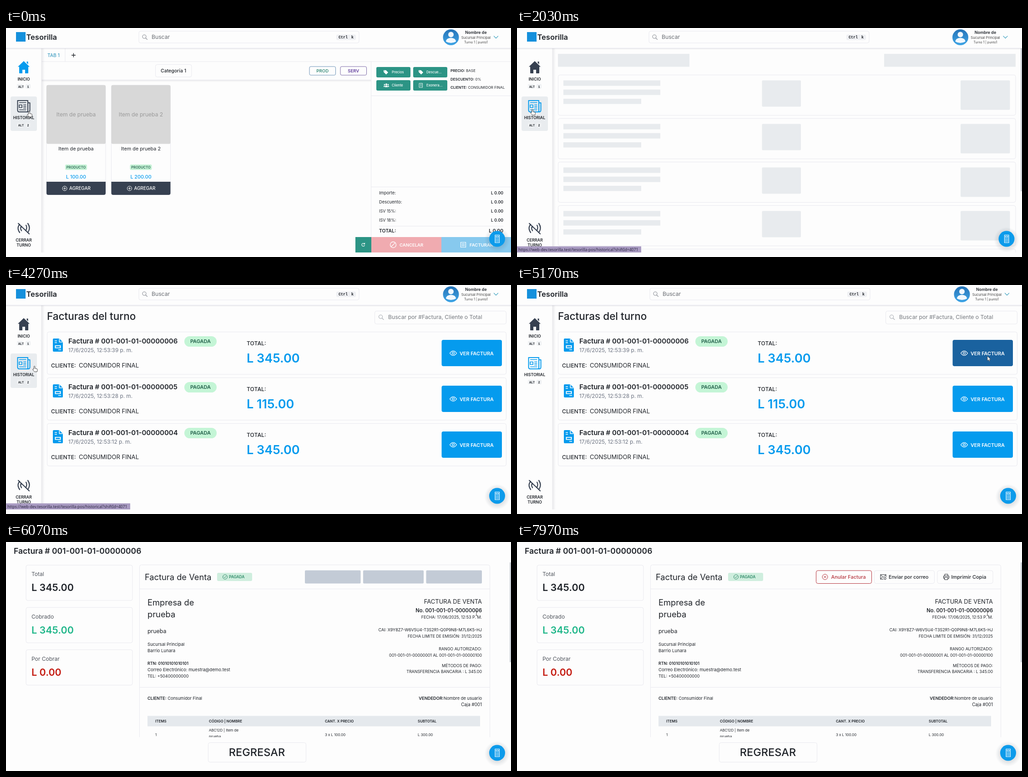
Animation of 1110x505 px, one loop 8 s. Source, as an HTML page:

```html
<!DOCTYPE html>
<html lang="es">
<head>
<meta charset="utf-8">
<title>Punto de venta</title>
<style>
html, body { margin: 0; width: 100%; height: 100%; overflow: hidden; background: #fdfdfd; }
svg { display: block; width: 1110px; height: 505px; font-family: Inter, sans-serif; cursor: default; user-select: none; }
</style>
</head>
<body>
<svg id="stage" viewBox="0 0 1110 505" xmlns="http://www.w3.org/2000/svg"></svg>
<script>
const LOOP = 8000;
const BLUE = '#059bee', DARK = '#374151', INK = '#1f2329', LINE = '#e9e9ef', TEAL = '#2c9485', BONE = '#e8ebee', PAGE = '#fdfdfd';
const MONO = "'Liberation Mono', monospace";

// Markup helpers
const text = (x, y, s, size, { w = 400, fill = INK, a = 'start', font = '' } = {}) =>
  `<text x="${x}" y="${y}" font-size="${size}" font-weight="${w}" fill="${fill}" text-anchor="${a}"${font && ` font-family="${font}"`}>${s}</text>`;
const rect = (x, y, w, h, fill, r = 0, stroke = 'none', extra = '') =>
  `<rect x="${x}" y="${y}" width="${w}" height="${h}" rx="${r}" fill="${fill}" stroke="${stroke}" ${extra}/>`;
const box = (x, y, w, h, r = 4) => rect(x, y, w, h, PAGE, r, LINE);
const line = (d, stroke = LINE, width = 1) =>
  `<path d="${d}" fill="none" stroke="${stroke}" stroke-width="${width}" stroke-linecap="round" stroke-linejoin="round"/>`;
const shape = (d, fill) => `<path d="${d}" fill="${fill}" fill-rule="evenodd"/>`;
const circle = (x, y, r, fill = 'none', stroke = 'none', width = 1) =>
  `<circle cx="${x}" cy="${y}" r="${r}" fill="${fill}" stroke="${stroke}" stroke-width="${width}"/>`;
const group = (s, attrs = '') => `<g ${attrs}>${s}</g>`;
const at = (x, y, s) => group(s, `transform="translate(${x} ${y})"`);
const bold = (s, w = 600) => `<tspan font-weight="${w}">${s}</tspan>`;
const repeat = (n, fn) => Array.from({ length: n }, (_, i) => fn(i)).join('');
const lens = (x, y, c = '#8b8f96') => circle(x - 1, y - 1, 4, 'none', c, 1.1) + line(`M${x + 2} ${y + 2}l3.5 3.5`, c, 1.1);

function header() {
  const search = box(292, 7, 484, 26) + lens(305, 20) +
    text(320, 24.3, 'Buscar', 12.2, { fill: '#686c72' }) + rect(726, 14.5, 43, 12, '#eff0f3', 3) +
    text(731, 23.3, 'Ctrl', 8.4, { w: 700, font: MONO }) + text(759, 23.3, 'k', 8.4, { w: 700, font: MONO });
  const user = circle(978, 20.5, 17.5, 'url(#avatar)') + circle(978, 14.5, 6, '#f2f8fd') +
    shape('M967 30c0-11 22-11 22 0q-11 6-22 0z', '#f2f8fd') +
    text(1033, 12.6, 'Nombre de', 8.9, { w: 600, a: 'middle' }) +
    text(1033, 23.6, 'Sucursal Principal', 7.6, { a: 'middle', fill: '#444' }) +
    text(1033, 34, 'Turno 1 | punto1', 7, { a: 'middle', fill: '#444' }) +
    line('M1072.5 18l4.5 4.5 4.5-4.5', '#4ba8c4', 1.2);
  return rect(0, 0, 1110, 44.5, PAGE) + rect(0, 44, 1110, 1, '#e6e6ee') + rect(0, 45, 1110, 3, 'url(#fadeDown)') +
    rect(22, 9, 21, 21, '#1590dc') + text(44.5, 26, 'Tesorilla', 16.5, { w: 600 }) +
    group(search, 'id="search"') + group(user, 'id="user"');
}

function sidebar() {
  const label = (y, s) => text(39, y, s, 8.8, { w: 600, a: 'middle' });
  const keys = (y, n) => rect(24, y - 8, 14.5, 10, '#eff1f3', 2) + rect(43, y - 8, 11, 10, '#eff1f3', 2) +
    text(27, y, 'ALT', 6.7, { w: 700, font: MONO }) + text(46.5, y, n, 6.7, { w: 700, font: MONO });
  const paper = `<g id="paper" fill="none" stroke="${DARK}" stroke-width="2" stroke-linejoin="round">
    <path d="M25.500 160H48v25H29q-3.500 0-3.500-4zM48 165h4.500v16q0 4-3.500 4h-4"/>
    <path d="M29 164.500h15.500M29 169.500h6v6h-6zM38 169.500h6.500M38 173h6.500M38 176.500h6.500M29 180.500h15.500" stroke-width="1.700"/></g>`;
  const offline = line('M27 431l24 23M30 451q-7-10 0-18M34 447q-3-5-1-9M48 451q7-10 0-20M44 446q3-6 0-11', DARK, 2.2);
  return rect(0, 45, 78, 450, PAGE) + rect(78, 45, 7, 450, 'url(#fadeRight)') + rect(77.5, 45, 1, 450, '#e9e9ee') +
    group(rect(10, 151, 58, 76, '#e9ecef', 4), 'id="hover"') +
    group(shape('M39 73l13 12.500h-3V99q0 1-1 1h-6v-8h-6v8h-6q-1 0-1-1V85.500h-3L39 73zM45.500 74h3v6l-3-3z', 'currentColor'), 'id="house"') +
    label(115.5, 'INICIO') + keys(131.5, 1) + paper + label(201.3, 'HISTORIAL') + keys(217, 2) +
    offline + label(470.5, 'CERRAR') + label(482.2, 'TURNO');
}

function product(x, name, price) {
  const mid = x + 65, center = { a: 'middle' };
  return rect(x, 126, 130, 242, PAGE, 4, LINE) + rect(x, 126, 130, 129.5, '#d8d8d8', 3) +
    text(mid, 195, name, 12.1, { ...center, fill: '#9a9a9a' }) + text(mid, 270, name, 10.8, center) +
    rect(mid - 24, 301, 48, 12, '#c6f2d6', 3) + text(mid, 310, 'PRODUCTO', 7.5, { ...center, w: 600, fill: '#2d6a55' }) +
    text(mid, 331.8, price, 10.8, { ...center, w: 500, fill: BLUE }) +
    shape(`M${x} 339h130v25q0 4-4 4H${x + 4}q-4 0-4-4z`, DARK) +
    circle(x + 40, 353.8, 5, 'none', '#fff') + line(`M${x + 37.5} 353.8h5m-2.5-2.5v5`, '#fff') +
    text(x + 50, 357.4, 'AGREGAR', 9.9, { fill: '#fff', w: 500 });
}

function home() {
  const action = (x, y, s, icon) => rect(x, y, 75, 23, TEAL, 3) + at(x + 17, y + 11.5, icon) +
    text(x + (x < 890 ? 34 : 29), y + 14.3, s, 7.4, { fill: '#fff', w: 500 });
  const tag = shape('M-5-4.5h5l5 5-4.5 4.5-5.5-5.5z', '#fff') + circle(-3, -2.5, .8, TEAL);
  const people = circle(0, -2.3, 2, '#fff') + circle(-4, -1.5, 1.4, '#fff') + circle(4, -1.5, 1.4, '#fff') +
    shape('M-3 4q0-4 3-4t3 4zM-6 3.5q0-3 2.5-3V3.5zM6 3.5q0-3-2.5-3V3.5z', '#fff');
  const sheet = line('M-3.5-4.5h7v9h-7zM-1.5-2h3M-1.5 1h3', '#fff', .9);
  const filter = (x, s, c, edge) => rect(x, 85, 57.5, 19, PAGE, 3, edge) + text(x + 28.7, 98, s, 9.6, { w: 600, fill: c, a: 'middle' });
  const info = (y, k, v) => text(977, y, `${bold(k)} ${v}`, 8);
  const sum = (y, k, size = 9.4, w = 400, total = 8.8) => text(820, y, k, size, { w }) + text(1093, y, 'L 0.00', total, { w: 600, a: 'end' });
  return rect(78, 45, 1032, 450, PAGE) + line('M130 45v29M78 74h1032') +
    text(91, 64, 'TAB 1', 10.4, { fill: '#238fb8' }) + line('M144.5 60h8m-4-4v8', INK, 1.3) +
    rect(78, 114.5, 724, 5, 'url(#fadeDown)') + line('M78 114.5h724') + box(328.5, 80.5, 79.5, 27.5) +
    text(368, 98, 'Categoría 1', 10.5, { w: 500, a: 'middle' }) +
    filter(667, 'PROD', '#3d8f7e', '#6d93b8') + filter(735, 'SERV', '#6542a0', '#7c6aa8') +
    product(89, 'Item de prueba', 'L 100.00') + product(231.5, 'Item de prueba 2', 'L 200.00') +
    line('M802.5 74v421M803 149.5h307M803 350.5h307M820 437h273') +
    action(814, 86, 'Precios', at(4, 0, tag)) + action(895, 86, 'Descue...', tag) +
    action(814, 115, 'Cliente', at(5, 0, people)) + action(895, 115, 'Exonera...', sheet) +
    info(97, 'PRECIO:', 'BASE') + info(115.5, 'DESCUENTO:', '0%') + info(134, 'CLIENTE:', 'CONSUMIDOR FINAL') +
    sum(367, 'Importe:') + sum(387, 'Descuento:') + sum(407, 'ISV 15%:', 9) + sum(426.5, 'ISV 18%:', 9) + sum(450.5, 'TOTAL:', 10.5, 600, 10.4) +
    rect(768, 461, 35, 34, TEAL) + rect(803, 461, 154, 34, '#f0abb0') + rect(957, 461, 153, 34, '#87c9ee') +
    line('M788 476.2a3.3 3.3 0 1 0 .3 3M788.5 474v2.5h-2.5', '#fff', 1.1) +
    circle(851, 478, 6.5, 'none', '#fff', 1.3) + line('M855.5 473.5l-9 9', '#fff', 1.3) + text(865, 481.5, 'CANCELAR', 9.5, { w: 600, fill: '#fff' }) +
    line('M999.5 472.5h11v11h-11zM1002 475.5h6M1002 478h6M1002 480.5h6', '#fff', 1.2) + text(1019, 481.5, 'FACTURAR', 9.6, { w: 600, fill: '#fff' });
}

function loadingList() {
  const card = i => at(0, 96 * i, rect(90.5, 103.5, 1005.5, 89, PAGE, 4, LINE) +
    rect(102, 115.5, 213, 12, BONE) + rect(102, 135.7, 213, 12, BONE) + rect(102, 156, 171, 11.5, BONE) +
    rect(538.5, 115.5, 85.5, 58, BONE, 2) + rect(975, 115.5, 108.5, 65, BONE, 2));
  return rect(78, 45, 1032, 450, PAGE) + rect(90, 57, 289, 28.5, BONE) + rect(807, 57, 289, 28.5, BONE) +
    repeat(5, card) + rect(1107, 45, 3, 315, '#cfd2d8');
}

function invoiceList() {
  const card = ([number, time, amount], i) => at(0, 101 * i, box(90.5, 103.5, 1009, 93.5) +
    shape('M103 120q0-2 2-2h12l8 8v19q0 2-2 2h-18q-2 0-2-2zM116.5 118v8.5h8.5v-1.5h-7v-7zM107 122.5h5v1.5h-5zM107 126.5h5v1.5h-5zM107.5 133h13v6.5h-13zM109.5 134.8v2.9h9v-2.9zM115 142h6v1.5h-6z', BLUE) +
    text(137, 129.2, `Factura # 001-001-01-0000000${number}`, 15, { w: 600 }) +
    text(137, 148.2, `17/6/2025, 12:53:${time} p. m.`, 11.8, { fill: '#6b7280' }) +
    text(99, 182.2, 'CLIENTE:', 12.2, { w: 500 }) + text(160, 182.2, 'CONSUMIDOR FINAL', 13.1) +
    rect(392, 113, 71, 23, '#c4f5d6', 11.5) + text(427.5, 128.3, 'PAGADA', 11, { w: 600, fill: '#22604a', a: 'middle' }) +
    text(529, 133.2, 'TOTAL:', 12.2, { w: 500 }) + text(529, 171.2, amount, 27, { w: 600, fill: BLUE }) +
    rect(957.5, 121, 132.5, 58, BLUE, 4, 'none', `class="open"`) +
    line('M975.5 150.3q7.5-10 15 0q-7.5 10-15 0z', '#fff', 1.2) + circle(983, 150.3, 2.4, 'none', '#fff', 1.2) +
    text(997, 154.5, 'VER FACTURA', 10.8, { w: 600, fill: '#fff' }));
  const rows = [[6, 39, 'L 345.00'], [5, 28, 'L 115.00'], [4, 12, 'L 345.00']];
  return rect(78, 45, 1032, 450, PAGE) + text(90, 77.3, 'Facturas del turno', 22.5, { w: 500 }) +
    box(810.5, 57.5, 289, 28.5) + lens(824.5, 71, '#a9adb3') +
    text(840, 75.4, 'Buscar por #Factura, Cliente o Total', 12.2, { fill: '#74787e' }) + rows.map(card).join('');
}

function invoice() {
  const cardY = i => 51 + 93.3 * i;
  const summary = [['Total', 'L 345.00', INK], ['Cobrado', 'L 345.00', '#1fb689'], ['Por Cobrar', 'L 0.00', '#c41a10']];
  const bones = repeat(3, i => rect(56, cardY(i) + 12, i < 2 ? 93.5 : 65, 17, BONE) + rect(56, cardY(i) + 31.5, i < 2 ? 93.5 : 65, 35, BONE)) +
    [[121, 51], [188, 17], [222, 14], [239, 14], [267, 14], [284, 14], [301, 14], [350, 14], [398, 32]]
      .map(([y, h]) => rect(311, y, 213, h, BONE) + rect(833, y, 213, h, BONE)).join('') + line('M293.5 331.5h770');
  const left = (y, s, size = 9.6, w = 400) => text(311, y, s, size, { w });
  const right = (y, s, size = 8.9, w = 400) => text(1046, y, s, size, { w, a: 'end' });
  const cell = (x, y, s, w = 400) => text(x, y, s, 7.9, { w });
  const details = left(140, 'Empresa de', 18.3) + left(166, 'prueba', 18.3) + left(200.5, 'prueba', 12.4) +
    left(229.3, 'Sucursal Principal') + left(243.3, 'Barrio Lunara') + left(271.3, 'RTN: 01010101010101', 8.8, 600) +
    left(285.3, 'Correo Electrónico: muestra@demo.test') + left(299.3, 'TEL: +50400000000', 9.1) +
    right(136, 'FACTURA DE VENTA', 13) + right(154.5, 'No. 001-001-01-00000006', 11.1, 600) +
    right(168.6, 'FECHA: 17/06/2025, 12:53 P. M.') + right(197, 'CAI: X9Y8Z7-W6V5U4-T3S2R1-Q0P9N8-M7L6K5-HJ', 9) +
    right(211, 'FECHA LIMITE DE EMISIÓN: 31/12/2025', 8.7) + right(239.2, 'RANGO AUTORIZADO:') +
    right(253.2, '001-001-01-00000001 AL 001-001-01-00000100') + right(275.5, 'MÉTODOS DE PAGO:') +
    right(289.3, 'TRANSFERENCIA BANCARIA : L 345.00') + line('M293.5 320.5h770') +
    left(348.3, `${bold('CLIENTE:')} Consumidor Final`, 9.2) + right(348.3, `${bold('VENDEDOR:')}Nombre de usuario`, 9.3) + right(361.8, 'Caja #001', 9.8) +
    rect(311, 383.5, 731, 23, '#e5e9ed') + cell(328, 397.7, 'ITEMS', 600) + cell(446, 397.7, 'CÓDIGO | NOMBRE', 600) +
    cell(701, 397.7, 'CANT. X PRECIO', 600) + cell(905, 397.7, 'SUBTOTAL', 600) +
    cell(328, 428, '1') + cell(446, 417.6, 'ABC12D | Item de') + cell(446, 431.8, 'prueba') + cell(701, 428, '3 x L 100.00') + cell(905, 428, 'L 300.00') +
    rect(464, 68, 77, 18, '#cfeede', 3) + circle(481.5, 77, 5, 'none', '#2f8a68') + line('M479 77l2 2 3-4', '#2f8a68') +
    text(490, 80.2, 'PAGADA', 8.4, { w: 600, fill: '#2f8a68' });
  const button = (x, w, s, size, c, edge, icon) => rect(x + .5, 63, w - 1, 28.5, PAGE, 4, edge) + at(x + 20, 77, icon) + text(x + (w > 125 ? 32 : x < 700 ? 33.5 : 31), 81, s, size, { w: 500, fill: c });
  const buttons = button(657, 123, 'Anular Factura', 10.9, '#b5333c', '#b5333c', circle(0, 0, 6, 'none', '#b5333c') + line('M-2.3-2.3l4.6 4.6m0-4.6l-4.6 4.6', '#b5333c')) +
    button(785, 133, 'Enviar por correo', 10.6, INK, LINE, line('M6 0v-5H-6V5H0M-6-5L0 1 6-5M-6 5l4-5', INK) + circle(4, 3.5, 2.2, 'none', INK)) +
    button(923.5, 123, 'Imprimir Copia', 11, INK, LINE, line('M-3.5-2v-4h7v4M-3.5 3H-6v-5H6v5H3.5M-3.5 1h7v5h-7z', INK));
  const amounts = summary.map(([k, v, c], i) => text(56, cardY(i) + 24.3, k, 12, { fill: '#50555d' }) +
    text(56, cardY(i) + 57.3, v, 21.5, { w: 600, fill: c })).join('');
  const main = line('M293.5 440V54.5q0-4 4-4h762q4 0 4 4V440M293.5 103.5h770') + text(305, 83.6, 'Factura de Venta', 18.3) +
    group(bones, 'id="bones"') + group(details, 'id="details"') +
    group([[657, 122.5], [785, 133], [923.5, 122.5]].map(([x, w]) => rect(x, 62.5, w, 29, '#c3cbd6', 2)).join(''), 'id="buttonBones"') + group(buttons, 'id="buttons"');
  return rect(0, 0, 1110, 495, PAGE) + text(17, 26.2, '', 17.5, { w: 600 }).replace('<text', '<text id="title"') +
    repeat(3, i => box(44, cardY(i), 234, 78)) + group(main, 'clip-path="url(#sheetClip)"') + group(amounts, 'id="amounts"') +
    box(444.5, 442.5, 215, 43) + text(551.5, 471.8, 'REGRESAR', 23.5, { w: 500, a: 'middle' }) +
    group(rect(1107, 45, 3, 220, '#cdd2d8'), 'id="drawerBar"');
}

const fab = circle(1079.5, 467, 28, 'url(#halo)') + circle(1079.5, 465, 17.5, '#0d9beb') +
  line('M1075 456.5h9.5v17h-9.5zM1077 459h5.5v2.5h-5.5z', '#fff', 1.1) +
  repeat(9, i => circle(1077.2 + i % 3 * 2.5, 464.7 + Math.floor(i / 3) * 3, .85, '#fff'));

const statusBar = rect(0, 481.5, 273, 14, '#a99bc2') +
  text(3, 492, 'https://web-dev.tesorilla.test/tesorilla-pos/historical?shiftId=4071', 8.65, { fill: '#2b2540', font: "'Noto Sans', sans-serif" });

const pointers = group('<path d="M-1.5 1V-4q0-1.5 1.2-1.5T1-4v3.5l4.5 1.2Q6.5 1 6.3 2.5L5.5 7H0L-4 2.5q-.5-1.5 1-1.5z" fill="#fff" stroke="#333" stroke-width=".9"/>', 'id="hand"') +
  group('<path d="M0-5v10l2.4-2.2L4 6.2l1.6-.7L4 2.2h3.2z" fill="#fff" stroke="#444" stroke-width=".8"/>', 'id="arrow"') +
  group(line('M-1.5-5h3M0-5V5M-1.5 5h3', '#444', .9), 'id="beam"');

const fade = (id, dir) => `<linearGradient id="${id}" x1="0" y1="0" ${dir}><stop stop-color="#556" stop-opacity=".12"/><stop offset="1" stop-color="#556" stop-opacity="0"/></linearGradient>`;
const stage = document.getElementById('stage');
stage.innerHTML = `<defs>${fade('fadeDown', 'x2="0" y2="1"')}${fade('fadeRight', 'x2="1" y2="0"')}
  <linearGradient id="avatar" x1="0" y1="0" x2="0" y2="1"><stop stop-color="#2674b8"/><stop offset="1" stop-color="#3fa5e6"/></linearGradient>
  <radialGradient id="halo"><stop offset=".55" stop-color="#345" stop-opacity=".16"/><stop offset="1" stop-color="#345" stop-opacity="0"/></radialGradient>
  <clipPath id="pageClip"><rect width="1110" height="495"/></clipPath><clipPath id="sheetClip"><rect y="45" width="1110" height="385.5"/></clipPath></defs>` +
  rect(0, 0, 1110, 505, PAGE) +
  group(group(home(), 'id="home"') + group(loadingList(), 'id="loading"') + group(invoiceList(), 'id="list"') + sidebar() + header() +
    group(statusBar, 'id="status"') + rect(0, 0, 1110, 495, '#000', 0, 'none', 'id="shade"') + group(invoice(), 'id="drawer"'), 'clip-path="url(#pageClip)"') +
  group(fab, 'id="fab"') + group(pointers, 'id="pointer"');

const el = id => document.getElementById(id);
const show = (id, on) => { el(id).style.display = on ? '' : 'none'; };
const move = (id, x, y = 0) => el(id).setAttribute('transform', `translate(${x} ${y})`);
const progress = (t, start, length) => Math.min(1, Math.max(0, (t - start) / length));
const smooth = p => p * p * (3 - 2 * p);
const mix = (a, b, p) => a + (b - a) * p;
const firstOpen = stage.querySelector('.open');

const TIME = { status: 350, click: 900, loaded: 2200, leave: 4200, drawer: 5231, data: 5900, buttons: 6750 };

function render(t) {
  const isHome = t < TIME.click, isLoading = !isHome && t < TIME.loaded;
  const settle = smooth(progress(t, 80, 500)), travel = smooth(progress(t, TIME.leave, 700));
  const x = mix(mix(51, 34, settle), 1034, travel), y = mix(mix(189, 185, settle), 162, travel);
  const overLink = x < 68, overButton = x > 958;
  const slide = 1 - (1 - progress(t, TIME.drawer, 507)) ** 2;
  const opened = t >= TIME.drawer, hasData = t >= TIME.data, hasButtons = t >= TIME.buttons;

  show('home', isHome);
  show('loading', isLoading);
  show('list', t >= TIME.loaded);
  el('house').style.color = isHome ? BLUE : DARK;
  el('paper').setAttribute('stroke', isHome ? DARK : BLUE);
  show('hover', overLink);
  show('status', overLink && t >= TIME.status);
  move('search', isLoading ? -2 : 0);
  move('user', isLoading ? -3.5 : 0);
  move('fab', isLoading ? -3.5 : 0);
  firstOpen.setAttribute('fill', overButton ? '#1a629f' : BLUE);

  el('shade').setAttribute('opacity', .4 * progress(t, TIME.drawer, 90));
  show('shade', opened);
  show('drawer', opened);
  move('drawer', 1110 * (1 - slide));
  el('title').textContent = hasData ? 'Factura # 001-001-01-00000006' : 'Factura # 6';
  show('bones', !hasData);
  show('details', hasData);
  show('amounts', hasData);
  show('drawerBar', hasData);
  show('buttonBones', !hasButtons);
  show('buttons', hasButtons);

  move('pointer', x, y + (hasData ? -5 : 0));
  show('hand', overLink);
  show('arrow', !overLink && !hasData);
  show('beam', hasData);
}

const start = performance.now();
function tick(now) {
  render(Math.max(0, now - start) % LOOP);
  requestAnimationFrame(tick);
}
render(0);
requestAnimationFrame(tick);
</script>
</body>
</html>
```
